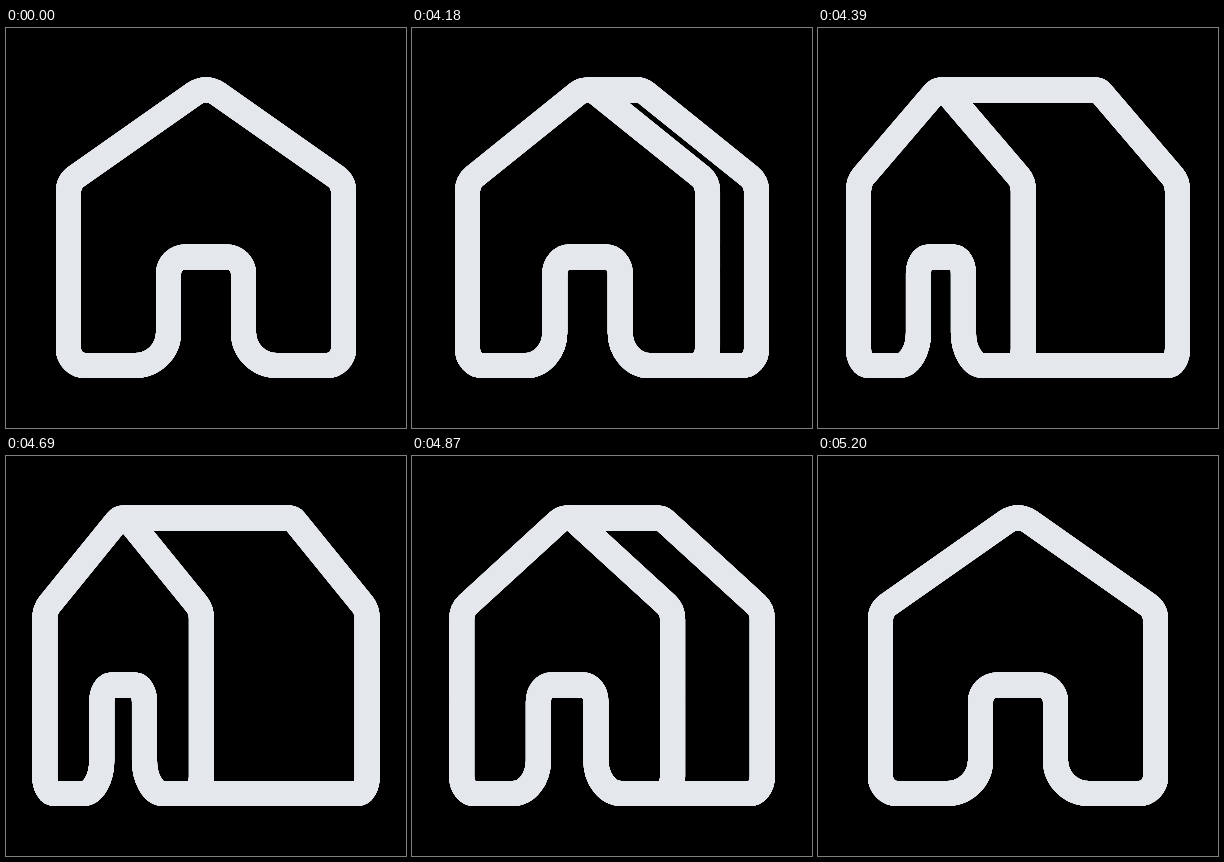
An HTML page with a canvas for the animation above (5230 ms loop, 400 px wide and 400 px high).

```html
<!DOCTYPE html>
<html>
<head>
<meta charset="utf-8">
<style>
  html, body { margin: 0; width: 100%; height: 100%; overflow: hidden; background: #000; }
  canvas { display: block; width: 400px; height: 400px; }
</style>
</head>
<body>
<canvas id="stage" width="400" height="400"></canvas>
<script>
const ctx = document.getElementById('stage').getContext('2d');
const LOOP = 5230, STEP = 30;
const OPEN = 4000, OPENED = 4600, CLOSE = 4645, CLOSED = 5200;
const HALF = 137.5, EAVE = 154, PEAK_Y = 57.5, RIDGE = 62, FLOOR = 337.5;
const DOOR = 37.5, DOOR_TOP = 229, FLARE = 33.3, ROUND = 16.7;

const mix = (a, b, p) => a + (b - a) * p;

// Bezier easing with handles (x1, 0) and (x2, 1)
function ease(x, x1, x2) {
  let lo = 0, hi = 1;
  for (let i = 0; i < 30; i++) {
    const s = (lo + hi) / 2, r = 1 - s;
    if (3 * r * r * s * x1 + 3 * r * s * s * x2 + s * s * s < x) lo = s;
    else hi = s;
  }
  return lo * lo * (3 - 2 * lo);
}

function turnAmount(ms) {
  const t = OPEN + Math.floor((ms - OPEN) / STEP) * STEP;
  if (t <= OPEN || t >= CLOSED) return 0;
  if (t < OPENED) return ease((t - OPEN) / (OPENED - OPEN), 0.5, 0.133);
  if (t < CLOSE) return 1;
  return 1 - ease((t - CLOSE) / (CLOSED - CLOSE), 0.5, 0.285);
}

// Repeated strokes make the edge pixels solid, for a crisp outline
function crispStroke() {
  for (let i = 0; i < 8; i++) ctx.stroke();
}

function frontWall(cx, k) {
  ctx.beginPath();
  ctx.setTransform(k, 0, 0, 1, cx, 0);
  ctx.moveTo(-HALF, 250);
  ctx.arcTo(-HALF, EAVE, 0, PEAK_Y, 18);
  ctx.arcTo(0, PEAK_Y, HALF, EAVE, 20);
  ctx.arcTo(HALF, EAVE, HALF, FLOOR, 18);
  ctx.arcTo(HALF, FLOOR, 0, FLOOR, ROUND);
  ctx.arcTo(DOOR, FLOOR, DOOR, DOOR_TOP, FLARE);
  ctx.arcTo(DOOR, DOOR_TOP, 0, DOOR_TOP, ROUND);
  ctx.arcTo(-DOOR, DOOR_TOP, -DOOR, FLOOR, ROUND);
  ctx.arcTo(-DOOR, FLOOR, -HALF, FLOOR, FLARE);
  ctx.arcTo(-HALF, FLOOR, -HALF, EAVE, ROUND);
  ctx.closePath();
  ctx.resetTransform();
  crispStroke();
}

function sideWall(cx, k) {
  const corner = HALF * (RIDGE - PEAK_Y) / (EAVE - PEAK_Y);
  ctx.beginPath();
  ctx.moveTo(cx, RIDGE);
  ctx.setTransform(k, 0, 0, 1, 400 - cx, 0);
  ctx.arcTo(corner, RIDGE, HALF, EAVE, ROUND);
  ctx.arcTo(HALF, EAVE, HALF, FLOOR, 18);
  ctx.arcTo(HALF, FLOOR, 0, FLOOR, ROUND);
  ctx.resetTransform();
  ctx.lineTo(cx + HALF * k - 20, FLOOR);
  crispStroke();
}

function draw(now) {
  const p = turnAmount(now % LOOP);
  const left = mix(62.5, 38.6, p), right = mix(337.5, 194, p);
  const cx = (left + right) / 2, k = (right - left) / (2 * HALF);
  ctx.fillStyle = '#000';
  ctx.fillRect(0, 0, 400, 400);
  ctx.strokeStyle = '#e4e7ec';
  ctx.lineWidth = 25;
  ctx.lineJoin = 'round';
  if (p > 0) sideWall(cx, k);
  frontWall(cx, k);
}

let origin;
function tick(now) {
  origin ??= now;
  draw(now - origin);
  requestAnimationFrame(tick);
}
draw(0);
requestAnimationFrame(tick);
</script>
</body>
</html>
```
